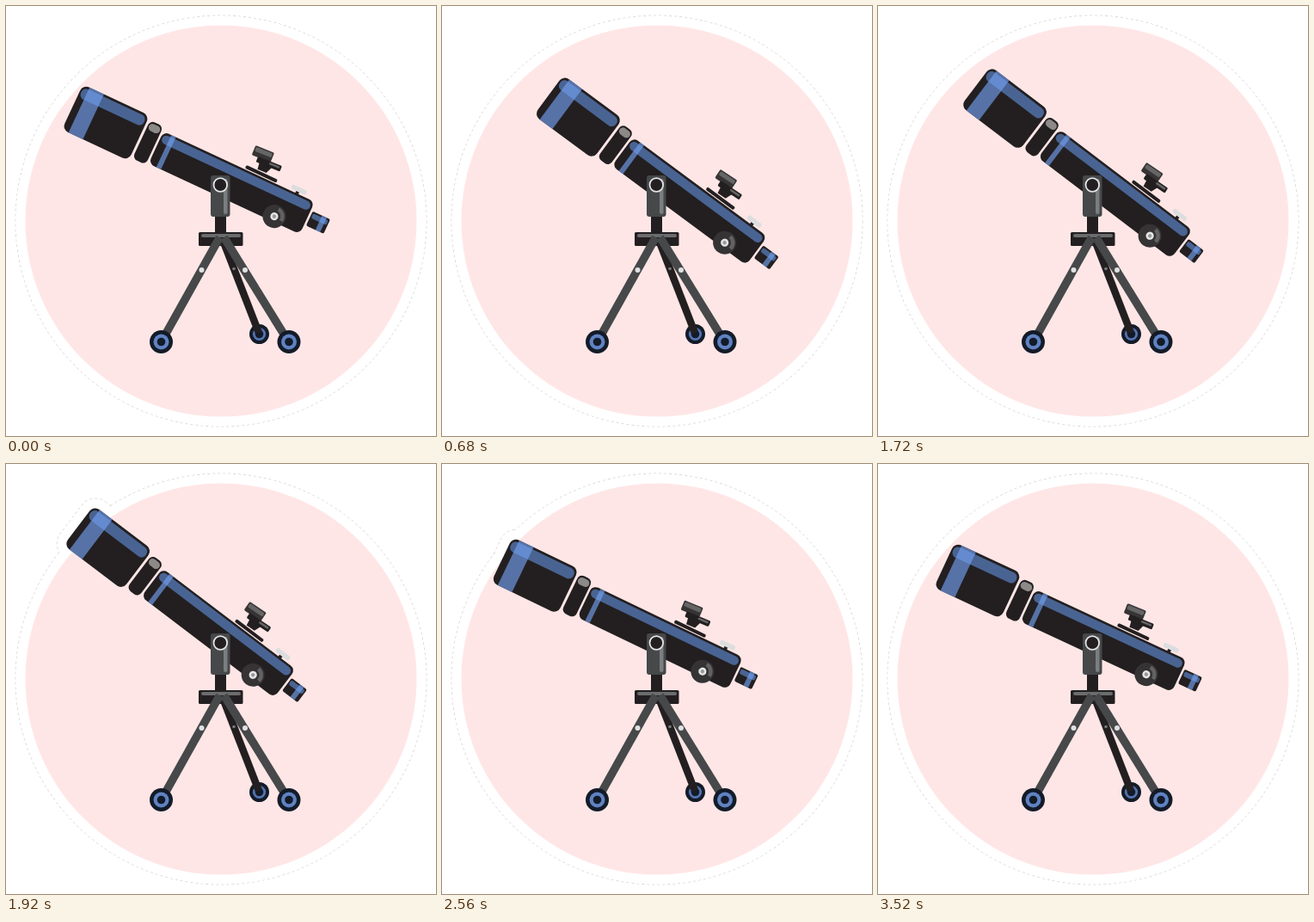
These frames come from a looping animation (500 px wide and 500 px high, 3.6 s). An HTML page:

```html
<!DOCTYPE html>
<html lang="en">
<head>
<meta charset="utf-8">
<title>Telescope</title>
<style>
  html, body { margin: 0; width: 100%; height: 100%; overflow: hidden; background: #fff; }
  svg { display: block; width: 100vw; height: 100vh; }
  .ink { fill: #231f20; }
  .steel { fill: #464849; }
  .shine { fill: #6799ea; fill-opacity: .57; }
  .band { fill: #74a2f2; fill-opacity: .64; }
  .edge { fill: none; stroke: #000; stroke-width: .6; stroke-dasharray: 3 3; stroke-opacity: .28; }
  .leg { stroke: #464849; stroke-width: 9.6; }
  .navy { fill: #141b28; }
  .blue { fill: #5f82c2; }
  .pin { fill: #dfe1e3; }
</style>
</head>
<body>
<svg viewBox="0 0 500 500">
  <!-- sticker border, widened where the tube leaves the disc -->
  <circle class="edge" cx="250" cy="250" r="239"/>
  <g class="tube">
    <rect class="edge" x="-205.3" y="-49.8" width="108" height="80.100" rx="19"/>
  </g>
  <circle cx="250" cy="250" r="238.6" fill="#fff"/>
  <g class="tube">
    <rect x="-205" y="-49.500" width="107.5" height="79.500" rx="19" fill="#fff"/>
  </g>
  <circle cx="250" cy="250" r="227.5" fill="#ffe6e6"/>

  <!-- tripod -->
  <g>
    <circle class="navy" cx="294.5" cy="381.5" r="11.5"/>
    <circle cx="294.5" cy="381.5" r="7.6" fill="#5474b3"/>
    <circle class="navy" cx="294.5" cy="381.5" r="4.8"/>
    <path d="M252 272L294 380" stroke="#231f20" stroke-width="8.6"/>
    <circle cx="265" cy="305.5" r="1.8" fill="#77797b"/>
    <rect class="ink" x="224" y="263" width="51.5" height="16" rx="1.5"/>
    <rect x="227" y="265" width="46" height="4" rx="2" fill="#6b6c6d"/>
    <path class="leg" d="M253.5 269L327 388"/>
    <path class="leg" d="M248.5 269L182 388"/>
    <circle class="pin" cx="227.5" cy="307" r="3"/>
    <circle class="pin" cx="278" cy="307" r="3"/>
    <g id="wheels"></g>
  </g>
  <rect class="ink" x="243" y="240" width="13" height="24"/>

  <!-- optical tube: pivot at the origin, axis along x -->
  <g class="tube">
    <rect class="ink" x="-194" y="-38.5" width="85.5" height="58" rx="8"/>
    <rect class="shine" x="-192" y="-35.7" width="81" height="13" rx="6"/>
    <rect class="band" x="-185.5" y="-38.5" width="18.5" height="58"/>

    <rect class="ink" x="-105.5" y="-33.7" width="17" height="49" rx="6"/>
    <rect x="-104" y="-31.5" width="14" height="9" rx="4.5" fill="#8c8987"/>

    <rect class="ink" x="-86" y="-28.6" width="194" height="41.4" rx="7"/>
    <rect class="shine" x="-84" y="-26" width="189.5" height="10.5" rx="5.25"/>
    <rect class="band" x="-76" y="-28.6" width="6" height="41.4"/>

    <rect class="ink" x="110.5" y="-17.7" width="22.5" height="18.4" rx="2"/>
    <rect class="shine" x="112" y="-15.7" width="19.5" height="6" rx="2"/>
    <rect class="band" x="122.5" y="-17.7" width="6" height="18.4"/>

    <rect class="ink" x="18" y="-33.8" width="40" height="4" rx="1.5"/>
    <g transform="rotate(-3 35 -48)">
      <path class="ink" d="M30 -44H46L42 -35H31Z"/>
      <rect x="18.5" y="-60" width="23.5" height="12" rx="1.5" fill="#363435"/>
      <rect x="20" y="-58.5" width="20.5" height="5" rx="1.5" fill="#666566"/>
      <rect class="ink" x="26" y="-49.2" width="30" height="7" rx="1.5"/>
      <rect x="41" y="-47.7" width="13" height="2.5" rx="1.2" fill="#666566"/>
    </g>

    <rect class="ink" x="83" y="-33" width="4" height="6"/>
    <rect x="76" y="-36.5" width="19" height="5.5" rx="2" fill="#dcdddf"/>

    <g transform="translate(72.5 6.6)">
      <circle r="13.5" fill="#353334"/>
      <path d="M.9 -9.5A9.5 9.5 0 0 1 9.4 1.6" fill="none" stroke="#636163" stroke-width="4.5"/>
      <circle r="4.6" fill="#e6e6e6"/>
      <circle r="2.2" fill="#98999b"/>
    </g>
  </g>

  <!-- yoke -->
  <rect class="steel" x="238" y="197" width="22.5" height="48" rx="3"/>
  <rect x="253" y="201" width="4.5" height="41" rx="2.2" fill="#7b7e80"/>
  <circle class="ink" cx="249.3" cy="208" r="7.8" stroke="#e3e4e5" stroke-width="1.8"/>
</svg>
<script>
const LOOP = 3600;
const PIVOT = "translate(249 208)";
const REST = 25, TILT = 12.2;
const OUT = 31.5, BACK = -30.7;
const tubes = document.querySelectorAll(".tube");

document.getElementById("wheels").innerHTML = [180.5, 329].map(x =>
  [["navy", 13.5], ["blue", 9], ["navy", 4.8]].map(([cls, r]) =>
    `<circle class="${cls}" cx="${x}" cy="390.5" r="${r}"/>`).join("")).join("");

// cubic-bezier(.25, .1, .25, 1)
function ease(x) {
  if (x <= 0) return 0;
  if (x >= 1) return 1;
  let lo = 0, hi = 1, u = .5;
  for (let i = 0; i < 24; i++) {
    u = (lo + hi) / 2;
    if (.75 * u * (1 - u) + u ** 3 < x) lo = u; else hi = u;
  }
  return .3 * u * (1 - u) ** 2 + 3 * u * u * (1 - u) + u ** 3;
}

const span = (t, from, to) => ease((t - from) / (to - from));

function draw(t) {
  const slide = OUT * span(t, 0, 330)
    + (BACK - OUT) * span(t, 1620, 2200)
    - BACK * span(t, 2270, 2990);
  const angle = REST + TILT * (span(t, 300, 840) - span(t, 2200, 2710));
  const pose = `${PIVOT} rotate(${angle.toFixed(3)}) translate(${slide.toFixed(3)} 0)`;
  tubes.forEach(el => el.setAttribute("transform", pose));
}

const start = performance.now();
function tick() {
  draw((performance.now() - start) % LOOP);
  requestAnimationFrame(tick);
}
draw(0);
requestAnimationFrame(tick);
</script>
</body>
</html>
```
